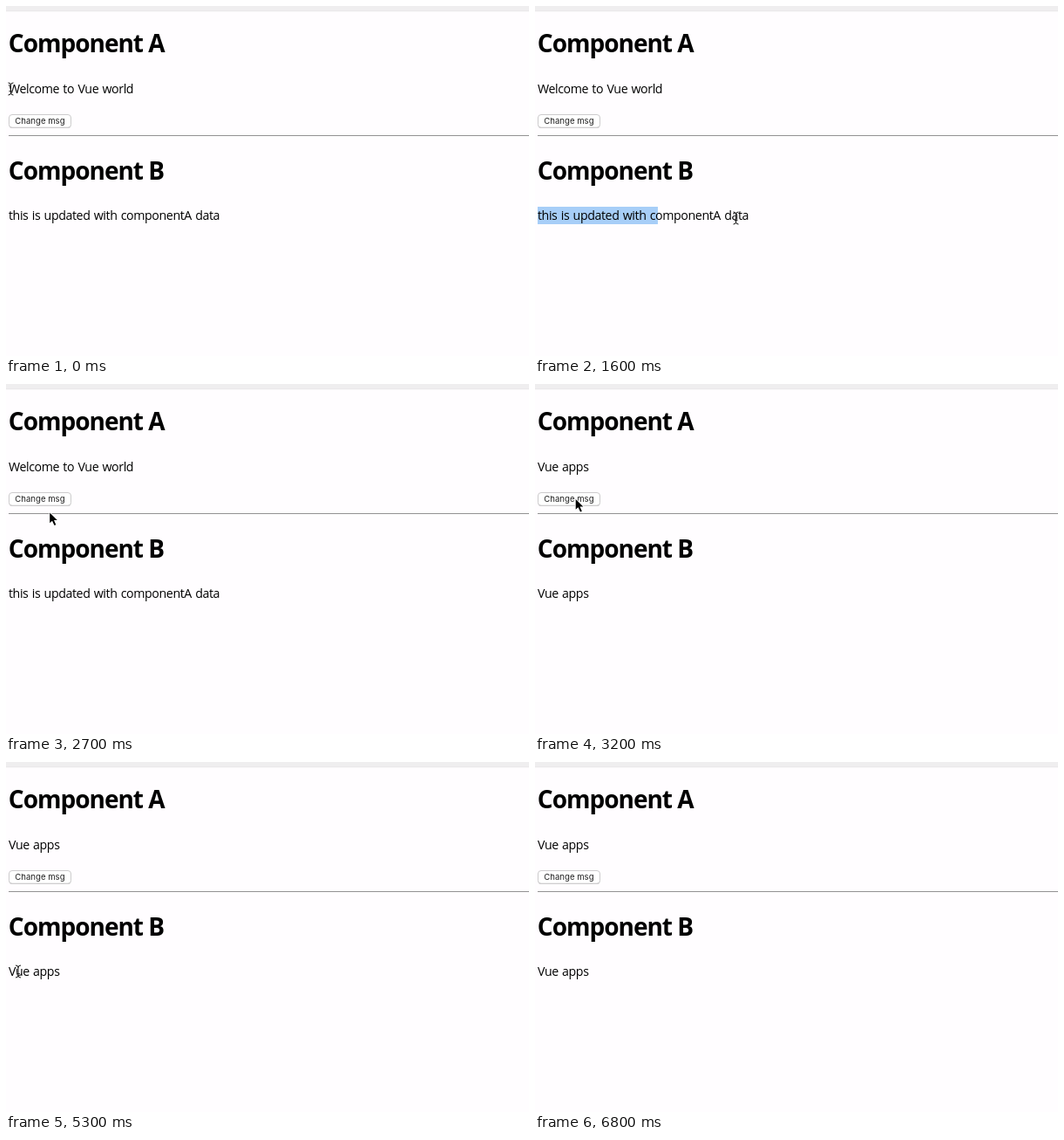
These frames come from a looping animation (600 px wide and 401 px high, 7.6 s). An HTML page:

```html
<!DOCTYPE html>
<html lang="en">
<head>
<meta charset="utf-8">
<title>Component data</title>
<style>
  html, body { margin: 0; width: 100%; height: 100%; overflow: hidden; background: #fffdff; }
  svg { display: block; width: 600px; height: 401px; }
  text { fill: #000; white-space: pre; }
  .head { font: 700 28px "Open Sans", "Noto Sans", sans-serif; letter-spacing: -1px; }
  .body { font: 400 14.2px "Open Sans", "Noto Sans", sans-serif; letter-spacing: -.4px; word-spacing: 1px; }
  .label { font: 400 9.6px Inter, Roboto, sans-serif; }
  .sel { fill: #a7cef8; }
</style>
</head>
<body>
<svg viewBox="0 0 600 401">
  <defs>
    <linearGradient id="press" x2="0" y2="1">
      <stop offset="0" stop-color="#6cb0fa"/>
      <stop offset="1" stop-color="#1374f6"/>
    </linearGradient>
    <path id="stem" d="M-3-7Q0-7 0-4.6Q0-7 3-7M0-5V5M-3 7Q0 7 0 4.6Q0 7 3 7M-2 2.7H2"/>
  </defs>
  <rect width="600" height="401" fill="#fffdff"/>
  <rect width="600" height="5" fill="#efeeef"/>
  <rect y="5" width="600" height="1" fill="#eae9ea"/>
  <rect y="6" width="600" height="1" fill="#f9f8f9"/>

  <rect id="selA" class="sel" x="3" y="84.5" height="20"/>
  <rect id="selB" class="sel" x="3" y="230" height="20"/>

  <text class="head" x="2.8" y="53">Component A</text>
  <text class="body" id="msgA" x="3" y="99.5"></text>

  <rect x="3.5" y="125" width="71" height="15" rx="3.5" fill="#c8c7c8"/>
  <rect id="button" x="3.5" y="124.5" width="71" height="14.7" rx="3.5" stroke="#cccbcc"/>
  <text class="label" id="label" x="10.3" y="135.3">Change msg</text>

  <rect x="3" y="148" width="597" height="1" fill="#929192"/>
  <text class="head" x="2.8" y="198.5">Component B</text>
  <text class="body" id="msgB" x="3" y="245"></text>

  <path id="arrow" d="M.7 .9V12.8L3.5 10.2L6 15.6L7.8 14.8L5.5 9.5H9.3Z"
        stroke="#fff" stroke-width="1.6" paint-order="stroke"/>
  <g id="beam" fill="none">
    <use href="#stem" stroke="#fff" stroke-width="2" opacity=".6"/>
    <use href="#stem" stroke="#111" stroke-width="1"/>
  </g>
</svg>
<script>
  const LOOP = 7600, STEP = 100, LAG = 56, LEFT = 3;
  const $ = id => document.getElementById(id);
  const lines = [
    { text: $("msgA"), mark: $("selA"), top: 84, before: "Welcome to Vue world" },
    { text: $("msgB"), mark: $("selB"), top: 229.5, before: "this is updated with componentA data" }
  ];

  const move = (from, to, x, y) => ({ from, to, x, y });
  const drag = (from, to, x, y) => ({ from, to, x, y, selects: true });
  const moves = [
    move(-1, 0, 5.5, 95),
    drag(100, 400, 219, 88),
    move(700, 800, 177, 131),
    move(800, 1300, 4, 235),
    drag(1500, 1600, 230.5, 243),
    drag(1600, 1800, 295, 243),
    move(1900, 2700, 49.5, 146.5),
    move(2700, 3000, 46, 131),
    move(3400, 3900, 5, 91),
    drag(4000, 4200, 82, 90.5),
    move(4200, 4800, 39, 278),
    move(4800, 5300, 14, 240),
    move(5300, 5600, 7, 240),
    drag(5700, 6100, 134, 239),
    move(6400, 6600, 134, 239),
    move(6600, 6800, 176, 209)
  ];

  const show = (el, on) => el.setAttribute("visibility", on ? "visible" : "hidden");
  const rightOf = line => LEFT + line.text.getComputedTextLength();
  const inRow = (line, y) => y >= line.top && y < line.top + 21;
  const moveAt = t => Math.max(0, moves.findLastIndex(m => m.from < t));

  function pointerAt(t) {
    const i = moveAt(t), a = moves[Math.max(0, i - 1)], b = moves[i];
    const left = Math.max(0, (b.to - t) / (b.to - b.from));
    const p = 1 - Math.min(1, left) ** 1.6;
    return { x: a.x + (b.x - a.x) * p, y: a.y + (b.y - a.y) * p };
  }

  function draw(time) {
    const t = Math.floor(time % LOOP / STEP) * STEP;
    const changed = t >= 3200, pressed = t === 3100;
    const { x, y } = pointerAt(t);
    const selecting = moves[moveAt(t)].selects;
    let beam = false;

    for (const line of lines) {
      line.text.textContent = changed ? "Vue apps" : line.before;
      const right = rightOf(line), over = inRow(line, y);
      // the highlight trails the pointer and stops at the end of the text
      const edge = selecting && over ? Math.min(right, pointerAt(t - LAG).x) : LEFT;
      line.mark.setAttribute("width", Math.max(0, edge - LEFT));
      beam ||= over && x < right;
    }
    $("button").setAttribute("fill", pressed ? "url(#press)" : "#fff");
    $("label").style.fill = pressed ? "#fff" : "#222";

    const visible = t < 6800, place = `translate(${x} ${y})`;
    $("arrow").setAttribute("transform", place);
    $("beam").setAttribute("transform", place);
    show($("arrow"), visible && !beam);
    show($("beam"), visible && beam);
  }

  const start = performance.now();
  function tick() {
    draw(performance.now() - start);
    requestAnimationFrame(tick);
  }
  tick();
</script>
</body>
</html>
```
